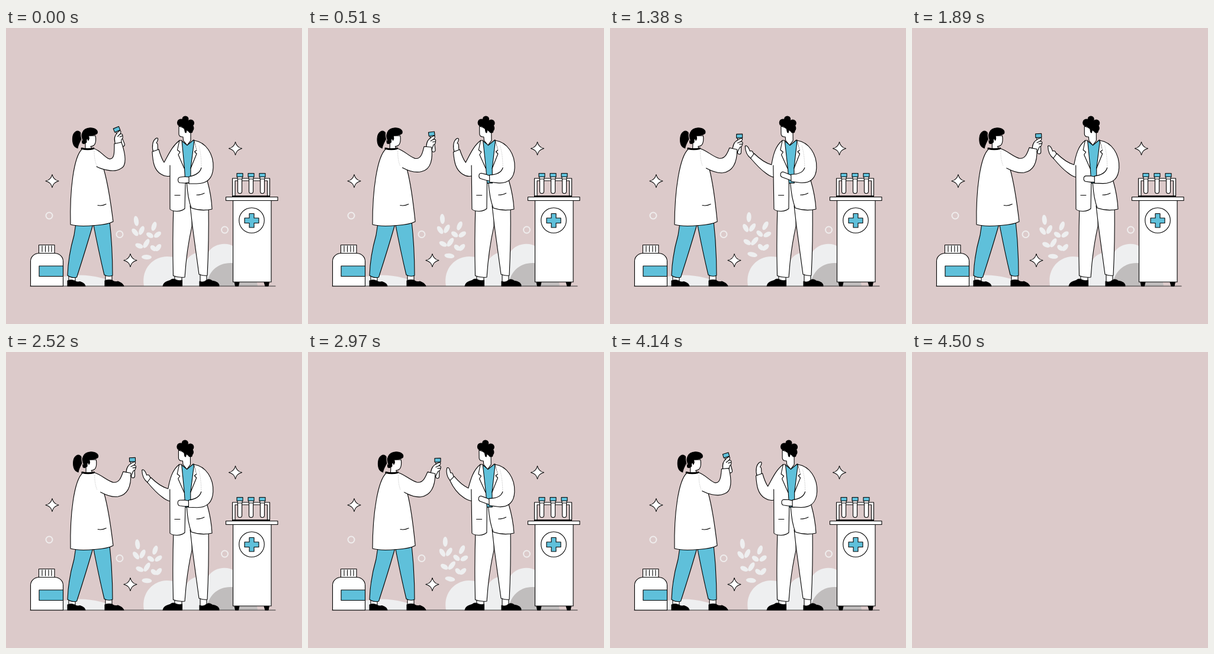
Animation, 500 px wide and 500 px high, one loop 4.53 s. Source, as an HTML page:

```html
<!DOCTYPE html>
<html lang="en">
<head>
<meta charset="utf-8">
<title>Lab talk</title>
<style>
  html, body { margin: 0; width: 100%; height: 100%; overflow: hidden; background: #dccaca; }
  svg { display: block; width: 100%; height: 100%; }
  .ink { fill: #fff; stroke: #000; stroke-width: 1.1; stroke-linejoin: round; stroke-linecap: round; }
  .line { fill: none; }
  .blue { fill: #5fc0da; }
  .black { fill: #000; }
  .pale { fill: #eeeff0; }
  .faint { fill: none; stroke: #999; stroke-width: .5; stroke-dasharray: 1 2; }
</style>
</head>
<body>
<svg viewBox="0 0 500 500">
  <g id="scene">
    <!-- backdrop -->
    <g class="pale">
      <path d="M97 420Q130 414 160 422Q181 427 184 436H97Z"/>
      <path d="M233 436C228 405 250 386 272 386C286 386 296 391 303 396C308 383 324 375 341 380C350 363 375 361 386 370V436Z"/>
      <g id="plant"></g>
    </g>
    <path d="M339 436C340 412 358 396 381 397C405 397 423 415 425 436Z" fill="#c0bdbd"/>
    <g id="rings" fill="none" stroke="#efeded" stroke-width="2"></g>
    <g id="stars" class="ink"></g>
    <path class="ink line" d="M41 436H455" style="stroke:#333"/>

    <!-- bottle -->
    <g class="ink">
      <path d="M41.500 436V394C41.500 387 47 381 55 380.500H83C91 381 96.500 387 96.500 394V436Z"/>
      <path d="M55.500 366.500H82V380.500H55.500Z"/>
      <path class="line" d="M61 368V378M66.500 368V378M72 368V378M77 368V378"/>
      <path class="blue" d="M56 402H96.500V419.500H56Z"/>
    </g>

    <!-- cabinet -->
    <g class="ink">
      <path class="black" d="M386 429H394L392.500 436H387.500ZM436 429H444.500L443 436H438Z"/>
      <path d="M383.500 291H448V429H383.500Z"/>
      <path d="M371.500 285.500H459V291.500H371.500Z"/>
      <circle cx="415" cy="325" r="21.300"/>
      <path class="blue" d="M411 313.500H419V321H427V329.500H419V337H411V329.500H403V321H411Z"/>
      <path d="M382.500 254H445.500V284H382.500Z"/>
      <path d="M387 258H441.500V284H387Z" style="fill:#dccaca"/>
      <path class="line" d="M383 284.200H445" style="stroke-width:2.200"/>
      <g id="rack"></g>
    </g>

    <!-- woman -->
    <g class="ink">
      <path d="M106 418H117V429H106ZM168 417H179V429H168Z"/>
      <path class="black" d="M104 436V427Q110 424 116 427Q119 430 125 428.500Q133 431 134 436ZM167 436V427Q172 424 179 426Q183 430 189 428Q197 431 199 436Z"/>
      <path class="blue" d="M118 330L115 350Q105 385 104 418Q111 423 119.500 421Q136 370 148 328Z"/>
      <path class="blue" d="M147 328Q157 380 166 417Q173 421 180 418Q180 370 175 326Z"/>
      <g id="woman">
        <g id="womanHead">
          <path d="M134 182H151C152 186 152.500 195 148 198.500C146 200 144 200 143 200L146 206H134Z"/>
          <path class="black" d="M126.500 178C121 170 113 176 112.500 186C112 195 115 201 121 203C122 195 127 190 128 184Z"/>
          <path class="black" d="M129 194.500C126.500 180 128 169.500 142 168.800C150 168.500 156 173 154 178C150 181 144 182 139.500 181.500C139.500 185 142 186 139 190C138 186 135.500 185 136 193C134 195.500 131 196 129 194.500Z"/>
          <path class="line" d="M127 176Q126 183 129 190" style="stroke:#dccaca"/>
        </g>
        <path d="M148 204H129C114 217 107.500 275 109 332Q122 336 150 333.500Q172 332 181 327C177 295 172 262 165 238"/>
        <path class="line" d="M128 203.500Q138 206 148 203.500" style="stroke-width:3"/>
        <path class="line" d="M155 299.500Q162 301 169 297.500"/>
        <g id="grip">
          <path d="M-3 3H3V27Q3 31 0 31Q-3 31 -3 27Z"/>
          <path class="blue" d="M-5 -3H5V3.500H-5Z"/>
          <path d="M-12 25C-11 17 -10 12 -6 9C-3 7 2 3 4.500 4.500C6 6 4 9 1.500 10C5 9 6.500 12 5 14C5 17 3 19 1 19L-3 27Z"/>
          <path class="line" d="M1.500 10L-3 12M5 14H0"/>
        </g>
        <path id="womanSleeve"/>
        <path class="faint" d="M149 208Q149 222 153 232"/>
      </g>
    </g>

    <!-- man -->
    <g class="ink">
      <path d="M285 417H297V428H285ZM328 415H339V430H328Z"/>
      <path class="black" d="M265 436C266 429 273 428 278 426Q281 423 285 424.500Q291 428 297.500 426V436ZM327 436V428Q333 431 339 426Q343 423 348 427C355 428 360 431 360 436Z"/>
      <path d="M283 300Q281 360 282.500 418.500Q291 422 302 421Q305 375 314 335L316 262H303Z"/>
      <path d="M311 300Q313 318 315 335L326 416Q333 419 340 418Q343 360 342 300Z"/>
      <g id="man">
        <path class="blue" d="M296 190L306 198L317 189L321 205L312 262H301L294 205Z"/>
        <path id="wave"/>
        <path id="manLeft"/>
        <path d="M277 232V306Q280 309.500 289 309.500Q298 309 302 305L303 262L301.500 237L297 190L293 190"/>
        <path class="line" d="M293 190L289.500 206L294 209.500L291 214L301 237"/>
        <path d="M318 189.500L312 237V262H305.500Q307 288 313 304Q330 310 348 306Q347 283 340 258"/>
        <path class="line" d="M318 190L322.500 206L318.500 209L322 212.500L312 237"/>
        <path class="line" d="M285 282.500H294M322 282Q330 282 335 279"/>
        <path id="manHand"/>
        <path id="manRight"/>
        <path class="faint" d="M326 199Q330 215 330 234"/>
        <g id="manHead">
          <path d="M292 166V179Q292 184 299 184L299.500 190L306 198L312 190V172Z"/>
          <g id="curls" class="black"></g>
          <path class="black" d="M301 168H309V173L305.500 171L304 177L302.500 176Z"/>
        </g>
      </g>
    </g>
  </g>
</svg>
<script>
const LOOP = 4530, STEP = 30, HIDE = 4500, SWAY = 2250;
const $ = id => document.getElementById(id);
const set = (id, name, value) => $(id).setAttribute(name, value);
const lerp = (a, b, k) => a + (b - a) * k;
const ease = p => (1 - Math.cos(Math.PI * p)) / 2;

// x, y, turn, length
const leaves = [
  [220, 326, -9, 8.5], [218, 345, -40, 7.5], [229, 342, 24, 8], [250, 335, 18, 8],
  [243, 350, -58, 6.5], [256, 349, 52, 7], [225, 368, -68, 7], [237, 364, 30, 8.5],
  [249, 372, -50, 6], [257, 371, 38, 7], [237.5, 387, 92, 8.5]
];
$('plant').innerHTML = leaves.map(([x, y, r, l]) =>
  `<ellipse rx="4" ry="${l}" transform="translate(${x} ${y}) rotate(${r})"/>`).join('');

$('rings').innerHTML = [[73, 317], [192, 348.5], [369.5, 341]].map(([x, y]) =>
  `<circle cx="${x}" cy="${y}" r="5.500"/>`).join('');

$('stars').innerHTML = [[78, 258.5], [387.5, 203.5], [210, 392.5]].map(([x, y]) =>
  `<path transform="translate(${x} ${y})" d="M0-11Q2-2 11 0Q2 2 0 11Q-2 2-11 0Q-2-2 0-11Z"/>`).join('');

$('rack').innerHTML = [395, 414, 433].map(x =>
  `<g transform="translate(${x} 0)"><path d="M-3.500 254V276Q-3.500 279.500 0 279.500Q3.500 279.500 3.500 276V254Z"/>
   <path d="M-4 251H4V255H-4Z"/><path class="blue" d="M-5 245.500H5V251.500H-5Z"/></g>`).join('');

$('curls').innerHTML = [[303, 154, 5], [295.5, 160, 6], [312, 160.5, 5.5], [304, 163, 7.5], [311, 169, 6], [312, 174, 3]]
  .map(([x, y, r]) => `<circle cx="${x}" cy="${y}" r="${r}"/>`).join('');

// rows of [time, value], eased between
const tracks = {
  lean: [[0, 0], [950, 1], [2250, 0], [3350, 1], [4500, 0]],
  reach: [[0, 0], [850, 0.97], [2250, 0.87], [3450, 1], [4500, 0]],
  wave: [[400, 0], [1300, 1], [2500, 1], [3850, 0]]
};

const poses = {
  womanSleeve: [
    'M148 203.5C160 207 165 217 174 221C184 223 183 207 183 195.5L195 193C202 213 205 234 193 238C182 245 160 238 153 234',
    'M148 203.5C160 207 170 217 181 220C192 222 196 210 199 203L212 206C212 222 208 242 188 245C175 246 166 240 160 237'
  ],
  manLeft: [
    'M293 190C281 199 275 213 267 227C263 221 260 212 258 205L247 209C248 226 250 240 262 247C268 251 273 251 277 250',
    'M293 190C281 199 277 215 274 231C264 228 253 220 245 212L239 220C244 226 254 238 264 245C269 249 273 251 277 252'
  ],
  wave: [
    'M249 210C246 201 247 190 254 186C258 185 257 190 254 194C258 195 255 200 257 207',
    'M240 221C232 215 230 206 230 199.5C233 197 236 202 238 208C242 206 243 210 245 214'
  ],
  manRight: [
    'M318 190C338 193 351 213 350 236C349 256 337 263 322 263L309 263L309 251C320 249 328 244 330 236',
    'M318 190C338 193 351 213 350 236C349 255 338 262 324 261L306 258L306 246C317 247 327 244 330 236'
  ],
  manHand: [
    'M310 252L302 251L294 252C289 253 290 261 294 261.5L302 262L310 261',
    'M307 248L300 244L293 240C288 240 287 247 291 249L300 253L307 257'
  ]
};

function sample(rows, t) {
  if (t <= rows[0][0]) return rows[0][1];
  for (let i = 1; i < rows.length; i++) {
    const [t0, a] = rows[i - 1], [t1, b] = rows[i];
    if (t < t1) return lerp(a, b, ease((t - t0) / (t1 - t0)));
  }
  return rows[rows.length - 1][1];
}

function morph(id, k) {
  const [from, to] = poses[id];
  const ends = to.match(/-?[\d.]+/g);
  let i = 0;
  set(id, 'd', from.replace(/-?[\d.]+/g, n => lerp(+n, +ends[i++], k).toFixed(2)));
}

// slant about a fixed baseline
const slant = (y, deg) => `translate(0 ${y}) skewX(${deg}) translate(0 ${-y})`;

function draw(t) {
  set('scene', 'visibility', t < HIDE ? 'visible' : 'hidden');
  const lean = sample(tracks.lean, t);
  const reach = sample(tracks.reach, t);
  const wave = sample(tracks.wave, t);

  set('plant', 'transform', `rotate(${12.2 * ease(2 * t / SWAY)} 262 401)`);

  set('woman', 'transform', slant(333, -2.24 * lean));
  set('womanHead', 'transform', `translate(${2.5 * lean} 0)`);
  set('grip', 'transform',
    `translate(${lerp(187, 216, reach)} ${lerp(171, 183, reach)}) rotate(${lerp(-22, 0, reach)})`);
  morph('womanSleeve', reach);

  set('man', 'transform', slant(309, 1.2 * lean));
  set('manHead', 'transform', `translate(${-1.2 * lean} 0)`);
  morph('manLeft', wave);
  morph('wave', wave);
  morph('manRight', lean);
  morph('manHand', lean);
}

const start = performance.now();
function tick() {
  const t = (performance.now() - start) % LOOP;
  draw(Math.floor(t / STEP) * STEP);
  requestAnimationFrame(tick);
}
tick();
</script>
</body>
</html>
```
